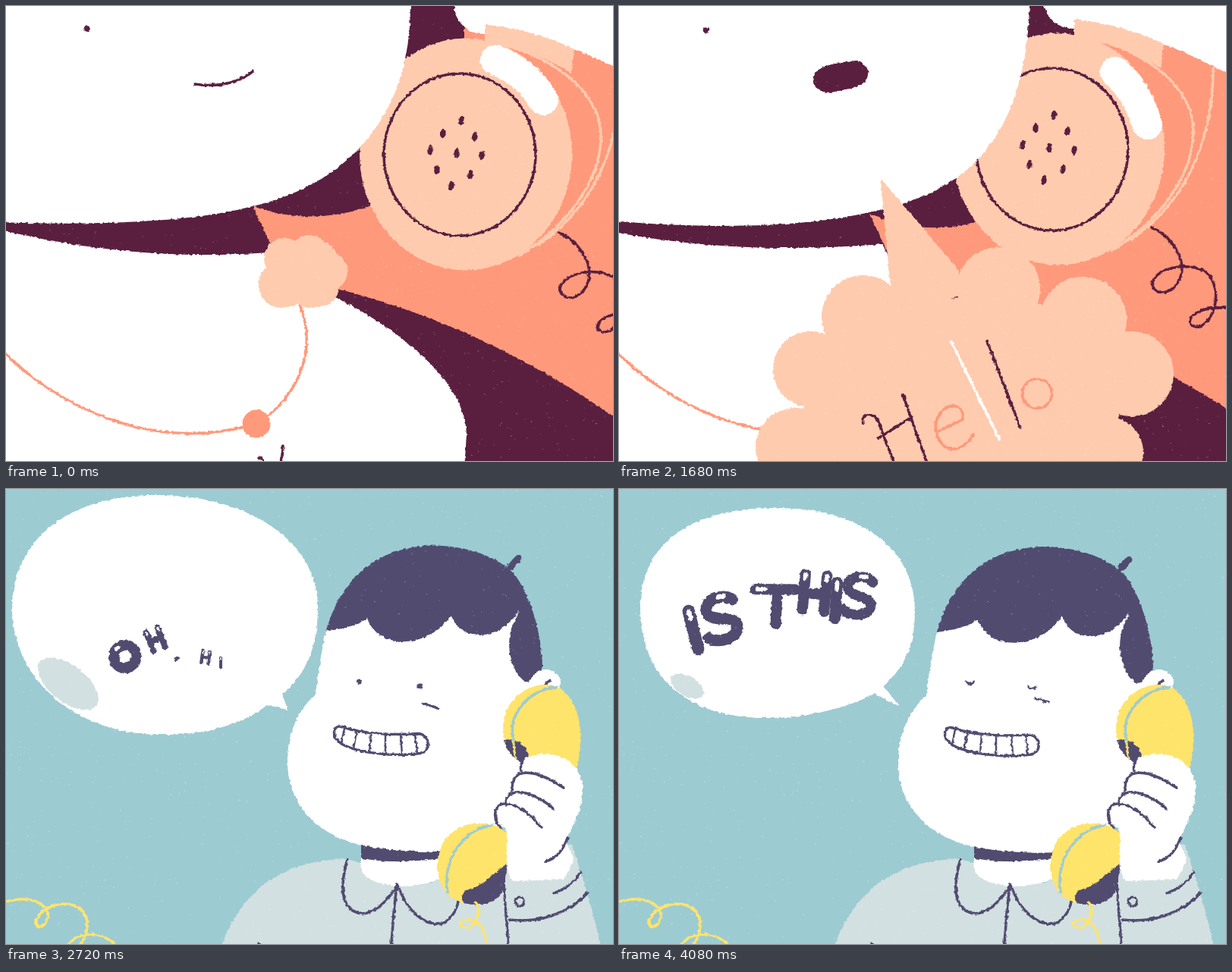
An HTML page with a canvas for the animation above (4160 ms loop, 800 px wide and 600 px high).

```html
<!DOCTYPE html>
<html lang="en">
<head>
<meta charset="utf-8">
<title>Phone call</title>
<style>
html, body { margin: 0; width: 100%; height: 100%; overflow: hidden; background: #fff; }
#stage { position: relative; width: 800px; height: 600px; overflow: hidden; }
canvas { position: absolute; left: -10px; top: -10px; filter: url(#rough); }
svg { position: absolute; width: 0; height: 0; }
</style>
</head>
<body>
<div id="stage">
  <canvas id="art" width="820" height="620" role="img" aria-label="Hello. Oh, hi. Is this"></canvas>
</div>
<svg>
  <filter id="rough" x="0" y="0" width="100%" height="100%" color-interpolation-filters="sRGB">
    <feTurbulence id="noise" type="fractalNoise" baseFrequency="0.22" numOctaves="2" seed="1" result="n"/>
    <feDisplacementMap in="SourceGraphic" in2="n" scale="4" xChannelSelector="R" yChannelSelector="G"/>
  </filter>
</svg>
<script>
const STEP = 80, STEPS = 52;
const WHITE = '#fff', PLUM = '#5a1f3f', SALMON = '#ff997b', PEACH = '#ffcbae';
const TEAL = '#9dcbd2', NAVY = '#514b70', YELLOW = '#ffe46b', SHIRT = '#d2e0e1';
const ctx = document.getElementById('art').getContext('2d');
const noise = document.getElementById('noise');
ctx.lineCap = ctx.lineJoin = 'round';

const clamp = v => Math.max(0, Math.min(1, v));
const lerp = (a, b, t) => a + (b - a) * t;
const smooth = v => { v = clamp(v); return v * v * (3 - 2 * v); };
const mixList = (a, b, t) => a.map((v, i) => lerp(v, b[i], t));

// Blend two path strings that share the same commands.
const NUM = /-?\d*\.?\d+/g;
function mix(a, b, t) {
  const to = b.match(NUM);
  let i = 0;
  return a.replace(NUM, n => lerp(+n, +to[i++], t).toFixed(2));
}

function fill(color, d) {
  ctx.fillStyle = color;
  ctx.fill(new Path2D(d));
}
function line(color, width, d) {
  ctx.strokeStyle = color;
  ctx.lineWidth = width;
  ctx.stroke(new Path2D(d));
}
function oval(color, x, y, rx, ry = rx, deg = 0) {
  ctx.fillStyle = color;
  ctx.beginPath();
  ctx.ellipse(x, y, rx, ry, deg * Math.PI / 180, 0, 7);
  ctx.fill();
}
function ring(color, width, x, y, rx, ry = rx) {
  ctx.strokeStyle = color;
  ctx.lineWidth = width;
  ctx.beginPath();
  ctx.ellipse(x, y, rx, ry, 0, 0, 7);
  ctx.stroke();
}
function shifted(x, y, draw) {
  ctx.save();
  ctx.translate(x, y);
  draw();
  ctx.restore();
}
function paper(color) {
  ctx.fillStyle = color;
  ctx.fillRect(-10, -10, 820, 620);
}

// ---------- Caller ----------
const HEAD = ['M-12 285C130 290 250 284 325 264C440 238 533 155 533 0L533 -12L-12 -12Z',
              'M-12 283C150 297 260 288 330 272C450 248 535 185 541 0L541 -12L-12 -12Z'];
const TORSO = ['M-12 294C80 316 200 336 345 325L370 358C470 390 607 480 607 565L604 612L-12 612Z',
               'M-12 297C80 315 200 326 347 314L370 358C470 390 607 480 607 565L604 612L-12 612Z'];
const HANDSET = ['M325 264Q395 290 475 266L604 200L604 -12L812 -12L812 549C700 470 560 395 370 358Z',
                 'M330 274Q395 303 467 286L604 200L604 -12L812 -12L812 538C700 465 560 395 370 358Z'];
const HOLES = [[573, 144], [549, 161], [591, 165], [532, 183], [567, 187], [600, 190], [541, 209], [585, 215], [560, 230]];
const PUFFS = [
  [[362, 369, 29], [360, 366, 27], [367, 333, 27], [400, 327, 25], [412, 335, 25], [424, 350, 26], [412, 370, 27], [400, 370, 28], [370, 370, 27]],
  [[236, 585, 52], [253, 498, 53], [332, 418, 53], [492, 385, 53], [597, 408, 53], [665, 470, 53], [675, 575, 51], [500, 660, 60], [330, 660, 60]],
  [[232, 582, 52], [253, 479, 50], [322, 410, 55], [500, 373, 55], [612, 414, 57], [675, 485, 56], [645, 588, 46], [500, 660, 60], [330, 660, 60]]
];
const TAIL = ['M390 340L375 360L385 365L400 360L405 355Z',
              'M345 230L375 377L380 420L440 400L440 357Z',
              'M346 230L358 362L370 410L450 380L446 348Z'];
const HELLO = [
  [PLUM, 'M328 541C326 527 342 525 346 540C352 565 358 580 364 606M377 500L404 606M346 557L396 520',
         'M322 550C318 537 333 535 341 546C348 565 356 585 364 606M374 512L407 606M342 570L386 542'],
  [SALMON, 'M422 553L452 535C455 520 432 518 424 540C415 570 440 600 475 567',
           'M418 562L453 545C456 520 425 522 418 548C413 580 445 602 467 565'],
  [WHITE, 'M444 438L498 558', 'M438 443L501 571'],
  [PLUM, 'M475 410L519 524', 'M485 442L529 556']
];
const GROW = [0, .1, .35, .7, 1.02, 1.08, 1.03, .99];

function drawPhone(a) {
  shifted(31 * (1 - a), 7 * (1 - a), () => {
    fill(WHITE, 'M560 -20L560 0C566 18 580 30 600 30L600 18C650 22 680 36 717 50C760 66 800 88 850 114L850 -20Z');
    fill(PEACH, 'M600 18C640 20 690 36 718 50L714 82C690 66 650 48 615 42L600 48Z');
  });
  shifted(27 * (1 - a), 7 * (1 - a), () => {
    line(PEACH, 3.5, 'M618 42C700 60 757 110 757 165C757 225 710 285 650 322');
    line(PEACH, 3.5, 'M783 82C783 150 765 245 675 308');
    oval(PEACH, 579, 188.5, 140, 153);
    ring(PLUM, 3.5, 571, 189, 100, 107);
    HOLES.forEach(([x, y]) => oval(PLUM, x, y, 3.6, 6.2, 10));
    line(PLUM, 3.5, 'M701 292C728 302 748 335 740 357C732 380 708 384 703 368C702 347 750 334 775 352C800 378 780 425 760 423C744 420 752 396 800 398');
  });
  line(WHITE, 40, mix('M645 71Q687 88 708 124', 'M654 87Q683 112 696 156', a));
}

function drawMouth(k) {
  if (k < 2) return line(PLUM, 3.5, 'M249 103Q293 110 326 86');
  const o = k < 12 ? smooth((k - 1) / 3) : smooth((15 - k) / 3);
  const [w, h, rx, ry] = mixList([74, 36, 24, 18], [109, 101, 54.5, 50.5], o);
  ctx.save();
  ctx.translate(lerp(292, 288, o), lerp(93, 95, o));
  ctx.rotate(-.2 * (1 - o));
  ctx.beginPath();
  ctx.roundRect(-w / 2, -h / 2, w, h, { x: rx, y: ry });
  ctx.fillStyle = PLUM;
  ctx.fill();
  if (o > .3) {
    ctx.clip();
    fill(SALMON, 'M-60 28Q-10 -8 60 4L60 60L-60 60Z');
  }
  ctx.restore();
}

function drawHello(k) {
  const g = k < GROW.length ? GROW[k] : 1;
  const d = Math.max(0, k - 8);
  const settle = i => 1 - Math.exp(-.45 * d) * Math.cos((.7 + .1 * i) * d);
  const blend = (list, f) => k < 8 ? f(list[0], list[1], g) : f(list[1], list[2], settle(1));
  const puffs = blend(PUFFS, (a, b, t) => a.map((p, i) => mixList(p, b[i], t)));
  puffs.forEach(([x, y, r]) => oval(PEACH, x, y, r));
  fill(PEACH, 'M' + puffs.map(p => p[0] + ' ' + p[1]).join('L') + 'Z');
  const tail = blend(TAIL, mix);
  fill(PEACH, tail);
  line(PEACH, 2, tail);
  if (g < .3) return;
  ctx.save();
  ctx.translate(390, 350);
  ctx.scale(g, g);
  ctx.translate(-390, -350);
  HELLO.forEach(([color, a, b], i) => line(color, 3.6, mix(a, b, settle(i))));
  ring(SALMON, 3.6, ...mixList([538, 486, 13], [551, 511, 19.5], settle(4)));
  ctx.restore();
}

function drawCaller(k) {
  const a = smooth(k / 5);
  paper(PLUM);
  fill(WHITE, mix(...TORSO, a));
  line(SALMON, 3.5, 'M-12 447C60 525 190 592 330 551C380 520 412 460 388 396L370 358');
  oval(SALMON, 330, 551, 18.5);
  line(PLUM, 3.5, 'M334 595L346 606M365 580Q365 592 361 604');
  fill(SALMON, mix(...HANDSET, a));
  drawPhone(a);
  fill(WHITE, mix(...HEAD, a));
  oval(PLUM, lerp(107, 114.5, a), lerp(30, 32, a), 3.8);
  drawMouth(k);
  drawHello(k);
}

// ---------- Friend ----------
const BALLOON = [
  'M371 291L344 285C310 312 260 325 200 324C90 322 10 250 8 160C8 60 90 10 190 8C320 5 411 70 411 155C411 210 395 245 364 270Z',
  'M366 281L341 270C310 290 250 305 195 305C80 304 30 260 28 160C28 65 90 31 210 31C325 29 388 65 390 165C390 215 380 240 355 261Z',
  'M369 286L336 270C300 290 240 303 190 302C90 300 28 250 28 155C30 75 90 25 205 25C320 24 390 80 390 160C390 210 375 235 349 260Z'
];
const SHADE = [[82, 257, 47, 24, 38], [91, 258, 27, 15, 35], [90, 260, 24, 13, 30]];
const BALLOON_GROW = [0, .35, .75, .95];

// Unit glyphs: strokes, then shine.
const GLYPHS = {
  O: ['M0 -.33C.42 -.33 .42 .33 0 .33C-.42 .33 -.42 -.33 0 -.33Z', 'M-.26 -.2L-.2 -.27', .3],
  H: ['M-.23 -.38V.38M.23 -.38V.38M-.23 .02H.23', 'M-.23 -.38V-.28M.23 -.38V-.28', .23],
  I: ['M0 -.38V.38', 'M0 -.38V-.24', .24],
  S: ['M.27 -.3C.14 -.46 -.26 -.42 -.24 -.17C-.2 .06 .28 -.04 .26 .2C.22 .42 -.16 .44 -.3 .3', 'M.02 -.4H.12', .21],
  T: ['M-.42 -.34L.42 -.36M.04 -.34V.38', 'M-.38 -.34L-.22 -.35', .23],
  ',': ['M.15 -.15L-.1 .15', '', .5]
};
// Per letter: x, y, size, tilt at each key time.
const OH_HI = [
  ['O', [157, 221, 46, 0], [92, 172, 74, -8], [118, 123, 33, 85]],
  ['H', [197, 198, 35, -22], [153, 150, 66, -10], [167, 77, 23, -14]],
  [',', [225, 224, 8, 0], [202, 172, 16, 0], [205, 73, 11, 25]],
  ['H', [263, 222, 20, 8], [254, 158, 66, 4], [262, 87, 38, -5]],
  ['I', [283, 229, 17, 0], [315, 158, 62, 5], [306, 95, 34, 3]]
];
const IS_THIS = [
  ['I', [130, 231, 29, -22], [98, 186, 68, -14]],
  ['S', [151, 216, 38, -8], [135, 171, 72, -12]],
  ['T', [212, 230, 32, 6], [205, 154, 62, 2]],
  ['H', [242, 228, 38, 6], [258, 137, 62, 5]],
  ['I', [262, 234, 32, 8], [286, 147, 62, 4]],
  ['S', [284, 217, 34, 8], [316, 141, 64, 4]]
];

function glyph(name, [x, y, size, tilt]) {
  if (size < 1) return;
  const [body, shine, weight] = GLYPHS[name];
  ctx.save();
  ctx.translate(x, y);
  ctx.rotate(tilt * Math.PI / 180);
  ctx.scale(size, size);
  line(NAVY, weight, body);
  if (shine) line(WHITE, .09, shine);
  ctx.restore();
}

function along(k, times, poses) {
  if (k <= times[0]) return poses[0];
  for (let i = 1; i < times.length; i++) {
    if (k <= times[i]) return mixList(poses[i - 1], poses[i], smooth((k - times[i - 1]) / (times[i] - times[i - 1])));
  }
  return poses[poses.length - 1];
}

function drawBalloon(k) {
  if (k < 31) return;
  const s = k - 30 < BALLOON_GROW.length ? BALLOON_GROW[k - 30] : 1;
  const late = k > 44;
  const from = late ? 1 : 0;
  const t = late ? smooth((k - 44) / 7) : smooth((k - 34) / 6);
  ctx.save();
  ctx.translate(371, 291);
  ctx.scale(s, s);
  ctx.translate(-371, -291);
  fill(WHITE, mix(BALLOON[from], BALLOON[from + 1], t));
  oval(SHIRT, ...mixList(SHADE[from], SHADE[from + 1], t));
  ctx.restore();
  if (k < 47) OH_HI.forEach(([c, a, b, d]) => {
    const start = [a[0], a[1] + 8, 0, a[3]], end = [d[0], d[1] - 20, 0, d[3]];
    glyph(c, along(k, [32, 34, 39, 44, 47], [start, a, b, d, end]));
  });
  if (k > 41) IS_THIS.forEach(([c, a, b]) => {
    const start = [a[0], a[1] + 15, 0, a[3]];
    const peak = [b[0], b[1] - 4, b[2] * 1.06, b[3]];
    glyph(c, along(k, [41, 44, 49, 51], [start, a, peak, b]));
  });
}

function drawFace(k) {
  if (k > 49) {
    line(NAVY, 3, 'M458 254Q463 260 468 254M539 260Q544 266 549 261');
    line(NAVY, 3, 'M548 276L567 281');
  } else {
    oval(NAVY, 462.5, 255.5, 3.6);
    oval(NAVY, 543, 261.5, 3.6);
    line(NAVY, 3, 'M547 284L567 291');
  }
  const round = (k > 35 && k < 39) || (k > 41 && k < 47);
  if (k < 31) line(NAVY, 3.5, 'M449 346Q487 367 528 350');
  else if (round) oval(NAVY, 478, 329, 17, 8, 5);
  else {
    line(NAVY, 3.5, 'M440 315C470 326 515 326 540 324C556 325 558 347 543 350C510 355 462 350 440 338C424 328 428 312 440 315Z');
    line(NAVY, 2.5, 'M443 317L439 337M459 321L455 344M478 324L476 349M497 325L497 351M517 325L519 351M536 325L539 350');
  }
}

function drawFriend(k) {
  const h = k < 40 ? smooth((k - 29) / 3) : 1 - smooth((k - 46) / 3);
  paper(TEAL);
  line(YELLOW, 3.5, 'M-12 549C30 530 58 548 55 565C50 582 36 580 40 568C50 545 100 535 107 570C108 590 98 604 84 612M78 606C95 580 130 582 148 606');
  fill(SHIRT, 'M281 612C305 535 360 488 450 488L560 520L600 500L745 468C760 510 775 560 786 612Z');
  fill(WHITE, 'M468 465V500C472 528 545 528 572 514V465Z');
  fill(NAVY, 'M468 462V487C500 493 540 492 572 487V462Z');
  line(NAVY, 3.5, 'M450 488C441 520 438 557 470 560C490 558 505 540 516 522C528 555 550 577 575 573C588 568 595 552 596 543');
  line(NAVY, 3.5, 'M516 522C510 550 511 575 507 606M656 505C655 530 660 560 662 606');
  oval(NAVY, 333, 601, 2.5);

  shifted(3 * h, -1.5 * h, () => {
    fill(WHITE, 'M419 188C410 230 408 250 405 272C385 290 367 320 368 365C370 420 410 460 470 472C520 482 570 480 600 478L660 440L690 350L700 240L680 150L560 120Z');
    fill(NAVY, 'M419 189C430 150 460 80 557 76C620 76 655 100 668 115C690 145 703 195 704 235C700 250 690 255 682 256C665 245 656 215 662 190C664 180 670 172 673 162C650 200 598 207 584 168C555 212 488 215 473 172C455 185 435 186 419 189Z');
    line(NAVY, 9, 'M662 104L672 93');
    drawFace(k);
  });

  oval(WHITE, 711, 256, 20, 18);
  line(NAVY, 3, 'M711 258Q713 254 717 252');
  fill(YELLOW, 'M656 325C650 285 680 258 712 258C745 258 760 300 757 335C756 355 753 368 750 372L690 358C675 350 660 338 656 325Z');
  fill(NAVY, 'M657 331C670 326 690 340 689 356L682 361C670 358 658 345 657 331Z');
  line(TEAL, 3.5, 'M726 261C690 265 660 295 669 332');
  line(YELLOW, 3, 'M669 333Q669 345 672 355');
  fill(YELLOW, 'M662 453C630 432 595 438 576 466C562 495 567 535 602 546L648 525L664 492Z');
  fill(NAVY, 'M663 493C650 498 635 522 606 529C600 535 599 543 605 546C632 554 660 540 658 512Z');
  line(TEAL, 3.5, 'M641 443C605 449 575 485 582 532');
  line(YELLOW, 3, 'M619 545C626 555 622 570 612 577C602 581 595 574 600 570C612 564 632 568 634 606');

  fill(WHITE, 'M684 354C715 342 758 352 760 395C760 430 742 445 739 468L749 488L735 515L668 517C655 500 662 470 660 450L645 435C642 420 655 412 660 410C662 395 665 382 679 372Z');
  line(NAVY, 3.5, 'M682 357Q677 364 679 372M735 394C715 380 690 370 676 376C666 382 668 392 666 398');
  line(NAVY, 3.5, 'M721 421C700 403 675 394 663 404C658 408 659 412 660 416M705 446C692 428 665 408 650 417C642 425 643 437 652 447');
  line(NAVY, 3.5, 'M740 460C735 475 725 488 711 491');
  line(NAVY, 3.5, 'M664 568C700 573 742 560 766 533M722 533C740 526 751 517 757 505');
  ring(NAVY, 3.2, 677, 544, 5.6, 6);
  drawBalloon(k);
}

// ---------- Lightning wipe ----------
const WIPE_FROM = 24;
const WIPE = [520, 250, 80, 15, 0, -12, -130, -380];

function drawWipe(k) {
  const x = WIPE[k - WIPE_FROM];
  const region = d => {
    const path = new Path2D();
    path.addPath(new Path2D(d + 'L1500 612L1500 -12Z'), new DOMMatrix([1, 0, 0, 1, x, 0]));
    return path;
  };
  drawCaller(k);
  ctx.fillStyle = YELLOW;
  ctx.fill(region('M489 -12L411 407L330 368L290 612'));
  ctx.save();
  ctx.clip(region('M505 -12L426 432L341 393L306 612'));
  drawFriend(k);
  ctx.restore();
}

// Fine paper specks, seeded so they never jump.
const specks = new Path2D();
let seed = 7;
const random = () => (seed = seed * 16807 % 2147483647) / 2147483647;
for (let i = 0; i < 1300; i++) specks.rect(random() * 820 - 10, random() * 620 - 10, 1.1, 1.1);

function draw(k) {
  ctx.setTransform(1, 0, 0, 1, 10, 10);
  if (k < WIPE_FROM) drawCaller(k);
  else if (k < WIPE_FROM + WIPE.length) drawWipe(k);
  else drawFriend(k);
  ctx.fillStyle = 'rgba(255,255,255,.3)';
  ctx.fill(specks);
  noise.setAttribute('seed', 1 + (k >> 1) % 4);
}

const start = performance.now();
let shown = -1;
function tick() {
  const k = Math.floor((performance.now() - start) / STEP) % STEPS;
  if (k !== shown) draw(shown = k);
  requestAnimationFrame(tick);
}
tick();
</script>
</body>
</html>
```
